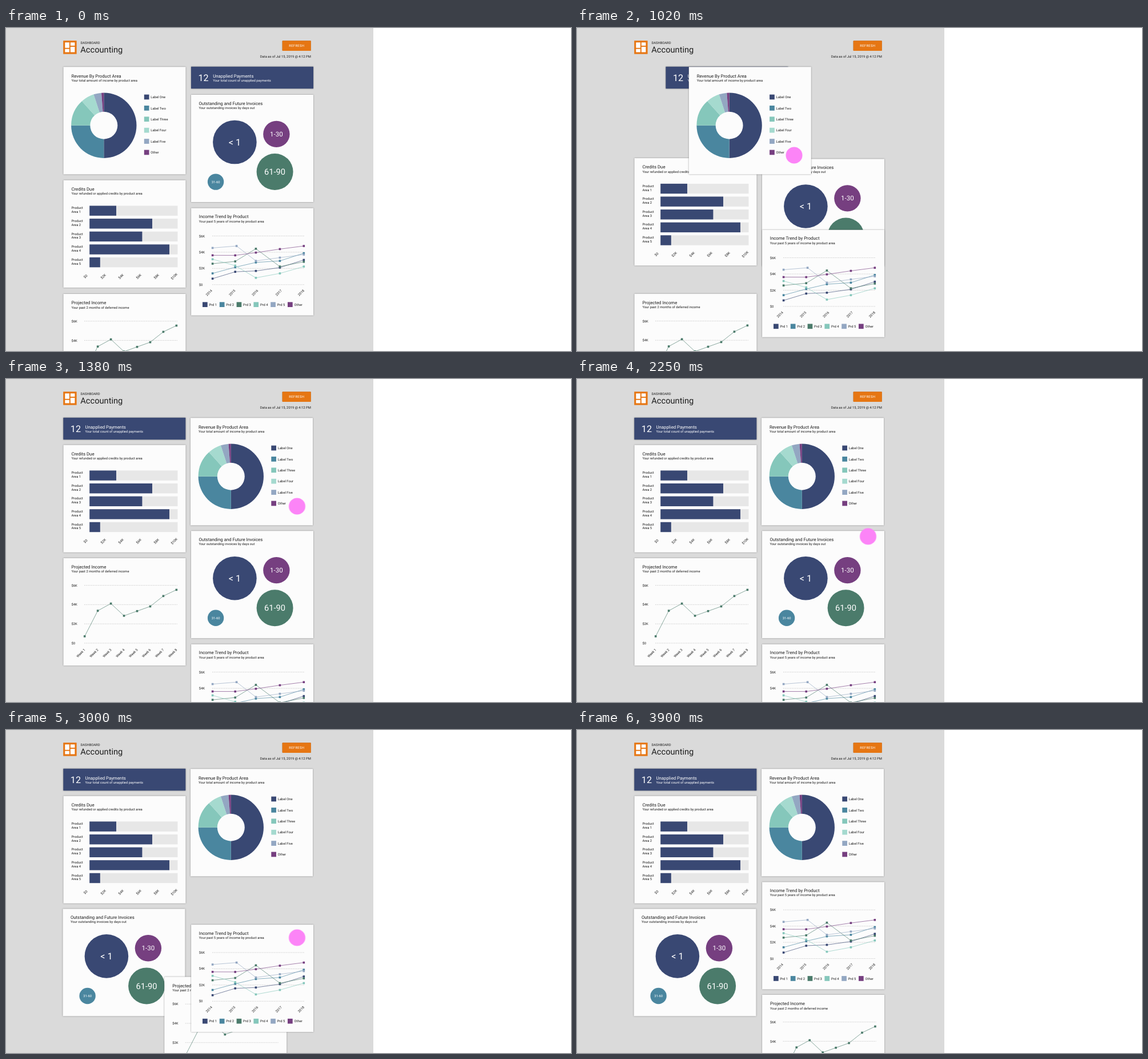
These frames come from a looping animation (989x566 px, 5430 ms). An HTML page:

```html
<!DOCTYPE html>
<html lang="en">
<head>
<meta charset="utf-8">
<title>Accounting dashboard</title>
<style>
html, body { margin: 0; width: 100%; height: 100%; overflow: hidden; background: #fff; }
svg { display: block; width: 989px; height: 566px; }
text { font-family: Roboto, sans-serif; font-size: 5.84px; fill: #1c1c1c; text-rendering: geometricPrecision; }
.title { font-size: 7.8px; }
.light text, text.light { fill: #fff; }
.mid { text-anchor: middle; }
.panel { fill: #fcfcfc; filter: drop-shadow(0 .6px .8px rgba(0, 0, 0, .42)); }
.grid { stroke: #b5b5b5; stroke-width: .6; stroke-dasharray: 1.8 1.2; }
.line { fill: none; stroke-width: .65; }

/* One loop is 5430 ms; neighbours ease aside in turn while a card is dragged linearly. */
.card, #cursor, #dot { animation: 5430ms linear infinite; }
#unapplied { animation-name: unapplied; }
#invoices { animation-name: invoices; }
#credits { animation-name: credits; }
#projected { animation-name: projected; }
#trend { animation-name: trend; }
#revenue { animation-name: revenue; }
#cursor { animation-name: cursor; }
#dot { animation-name: dot; }

@keyframes revenue {
  0%, 14.07% { transform: translate(0, 0); }
  25.12%, 100% { transform: translate(222.5px, 0); }
}
@keyframes unapplied {
  0% { transform: translate(0, 0); }
  15.18% { transform: translate(0, 0); animation-timing-function: ease-in-out; }
  20.7%, 100% { transform: translate(-223.7px, 0); }
}
@keyframes invoices {
  0% { transform: translate(0, 0); }
  15.18% { transform: translate(0, 0); animation-timing-function: ease-in-out; }
  20.7% { transform: translate(0, 149.2px); }
  49.72% { transform: translate(0, 149.2px); animation-timing-function: ease-in-out; }
  55.25%, 100% { transform: translate(-224.5px, 196.4px); }
}
@keyframes credits {
  0% { transform: translate(0, 0); }
  16.87% { transform: translate(0, 0); animation-timing-function: ease-in-out; }
  22.39%, 100% { transform: translate(0, -151.1px); }
}
@keyframes projected {
  0% { transform: translate(0, 0); }
  18.64% { transform: translate(0, 0); animation-timing-function: ease-in-out; }
  24.16% { transform: translate(0, -152.1px); }
  51.49% { transform: translate(0, -152.1px); animation-timing-function: ease-in-out; }
  57.02%, 100% { transform: translate(223.6px, -2px); }
}
@keyframes trend {
  0% { transform: translate(0, 0); }
  16.87% { transform: translate(0, 0); animation-timing-function: ease-in-out; }
  22.39%, 48.38% { transform: translate(0, 149.2px); }
  59.43%, 100% { transform: translate(0, -49.2px); }
}
@keyframes cursor {
  0%, 14.07% { transform: translate(283px, 223px); }
  25.12% { transform: translate(509.5px, 223px); }
  38.77% { transform: translate(509.5px, 223px); animation-timing-function: ease-in-out; }
  47.5%, 48.38% { transform: translate(509.5px, 491px); }
  59.43%, 100% { transform: translate(509.5px, 287px); }
}
@keyframes dot {
  0% { transform: scale(0); }
  .83% { transform: scale(0); animation-timing-function: ease-out; }
  4.8% { transform: scale(1.23); animation-timing-function: ease-in-out; }
  8.84% { transform: scale(1); }
  66% { transform: scale(1); animation-timing-function: ease-in-out; }
  71.7%, 100% { transform: scale(0); }
}
</style>
</head>
<body>
<svg id="stage" viewBox="0 0 989 566" xmlns="http://www.w3.org/2000/svg"></svg>
<script>
const navy = '#394873', teal = '#4a869f', mint = '#85c7bb', pale = '#a5dacf',
      blue = '#93a7c2', purple = '#763f80', green = '#4b7b6b', orange = '#e67613';

const each = (list, draw) => list.map(draw).join('');
const rect = (x, y, w, h, fill, extra = '') =>
  `<rect x="${x}" y="${y}" width="${w}" height="${h}" fill="${fill}" ${extra}/>`;
const text = (x, y, label, extra = '') => `<text x="${x}" y="${y}" ${extra}>${label}</text>`;
const heading = (x, y, title, subtitle) =>
  text(x, y, title, 'class="title"') + text(x, y + 7.4, subtitle);
const slanted = (x, y, label) =>
  text(0, 2.1, label, `class="mid" transform="translate(${x} ${y}) rotate(-45)"`);
const key = (x, y, color, label) =>
  rect(x, y - 4.4, 8.7, 8.7, color) + text(x + 11.5, y + 2.1, label);
const card = (id, x, y, h, body, extra = '') =>
  `<g class="card" id="${id}"><rect class="panel" x="${x}" y="${y}" width="214" height="${h}" ${extra}/>${body}</g>`;

const gridLines = (x, x1, x2, top, gap) => each(['$6K', '$4K', '$2K', '$0'], (label, i) => {
  const y = top + i * gap;
  return text(x, y + 2.1, label) + `<path class="grid" d="M${x1} ${y}H${x2}"/>`;
});
const series = (xs, ys, color) =>
  `<polyline class="line" stroke="${color}" points="${xs.map((x, i) => x + ',' + ys[i]).join(' ')}"/>` +
  each(xs, (x, i) => rect(x - 1.8, ys[i] - 1.8, 3.6, 3.6, color));

function slice([from, to, color]) {
  const at = (r, deg) => {
    const a = deg * Math.PI / 180;
    return `${171.3 + r * Math.sin(a)} ${170.7 - r * Math.cos(a)}`;
  };
  return `<path fill="${color}" d="M${at(57.2, from)}A57.2 57.2 0 0 1 ${at(57.2, to)}` +
    `L${at(24, to)}A24 24 0 0 0 ${at(24, from)}Z"/>`;
}

const bubble = ([x, y, r, color, size, label]) =>
  `<circle cx="${x}" cy="${y}" r="${r}" fill="${color}"/>` +
  text(x, y + size * .36, label, `class="mid light" style="font-size:${size}px"`);

const header =
  rect(0, 0, 643, 566, '#dadada') +
  rect(100.2, 22.2, 23.4, 23.4, orange) +
  rect(103.3, 25.3, 7.6, 9.5, '#fff') + rect(112.8, 25.3, 7.6, 5.7, '#fff') +
  rect(103.3, 36.7, 7.6, 5.7, '#fff') + rect(112.8, 32.9, 7.6, 9.5, '#fff') +
  text(130.5, 27.7, 'DASHBOARD') +
  text(130.3, 43, 'Accounting', 'style="font-size:14.65px"') +
  rect(483.6, 22.3, 50.2, 17.8, orange,
    'rx="1" style="filter:drop-shadow(0 .6px .7px rgba(0,0,0,.4))"') +
  text(508.8, 33.3, 'REFRESH', 'class="mid light" letter-spacing=".36"') +
  text(533.8, 52.4, 'Data as of Jul 15, 2019 @ 4:12 PM', 'text-anchor="end"');

const unapplied = card('unapplied', 324, 67.8, 38.4,
  '<g class="light">' + text(336.5, 92.8, '12', 'style="font-size:16.2px"') +
  heading(362.2, 86.6, 'Unapplied Payments', 'Your total count of unapplied payments') + '</g>',
  `style="fill:${navy}"`);

const invoices = card('invoices', 324, 117, 188,
  heading(337.4, 134.5, 'Outstanding and Future Invoices', 'Your outstanding invoices by days out') +
  each([
    [400.4, 200, 38.3, navy, 16.2, '&lt; 1'],
    [473.4, 185.9, 23.2, purple, 11.5, '1-30'],
    [470.6, 252, 32, green, 14.7, '61-90'],
    [367.1, 269.6, 14.2, teal, 5.84, '31-60']
  ], bubble));

const credits = card('credits', 100.5, 266.7, 188.2,
  heading(114.4, 284.9, 'Credits Due', 'Your refunded or applied credits by product area') +
  each([46.8, 109.8, 92.2, 139.8, 18.6], (w, i) => {
    const y = 311.5 + i * 22.6;
    return text(114.4, y + 5.8, 'Product') + text(114.4, y + 12.7, 'Area ' + (i + 1)) +
      rect(146.2, y, 154.3, 17.4, '#e7e7e7') + rect(146.2, y, w, 17.4, navy);
  }) +
  each(['$0', '$2K', '$4K', '$6K', '$8K', '$10K'], (label, i) =>
    slanted(139.2 + i * 31, 435.2, label)));

const weeks = [...Array(8).keys()].map(i => 137.7 + i * 22.95);
const projected = card('projected', 100.5, 466, 188.2,
  heading(114.4, 484.2, 'Projected Income', 'Your past 2 months of deferred income') +
  gridLines(114.4, 137, 300, 513.7, 33.75) +
  series(weeks, [603, 558.2, 545.6, 567, 558.8, 550.6, 532.4, 521.5], green) +
  each(weeks, (x, i) => slanted(x - 6.7, 632.2, 'Week ' + (i + 1))));

const years = [361.6, 401.2, 437.4, 479.4, 521.3];
const trend = card('trend', 324.1, 315.6, 188,
  heading(337.8, 333.3, 'Income Trend by Product', 'Your past 5 years of income by product area') +
  gridLines(337.8, 361, 523, 364.4, 28.45) +
  series(years, [439.2, 427.2, 425.7, 419.8, 406.4], navy) +
  series(years, [430, 419.2, 410.8, 408.1, 394.6], teal) +
  series(years, [413, 409, 386.8, 418, 409.7], green) +
  series(years, [405.2, 416.4, 437.8, 430, 418], mint) +
  series([361.6, 403.6, 437.4, 479.4, 521.3], [385.4, 382, 408.1, 402.4, 397], blue) +
  series(years, [398.3, 398.4, 393.6, 387.4, 382], purple) +
  each([355.2, 395.8, 435.8, 477.2, 516.4], (x, i) => slanted(x, 463.8, 2014 + i)) +
  each([navy, teal, green, mint, blue, purple], (color, i) =>
    key(344 + i * 29.8, 484.7, color, i < 5 ? 'Prd ' + (i + 1) : 'Other')));

const labels = ['Label One', 'Label Two', 'Label Three', 'Label Four', 'Label Five', 'Other'];
const revenue = card('revenue', 100.5, 68.2, 188.2,
  heading(114.4, 86.6, 'Revenue By Product Area', 'Your total amount of income by product area') +
  each([
    [0, 180, navy], [180, 270, teal], [270, 317.8, mint],
    [317.8, 341.8, pale], [341.8, 355.7, blue], [355.7, 360, purple]
  ], slice) +
  each([navy, teal, mint, pale, blue, purple], (color, i) =>
    key(241.8, 121 + i * 19.4, color, labels[i])));

const cursor = '<g id="cursor"><circle id="dot" r="14.5" fill="#fc84f7"/></g>';

document.getElementById('stage').innerHTML =
  header + unapplied + invoices + credits + projected + trend + revenue + cursor;
</script>
</body>
</html>
```
